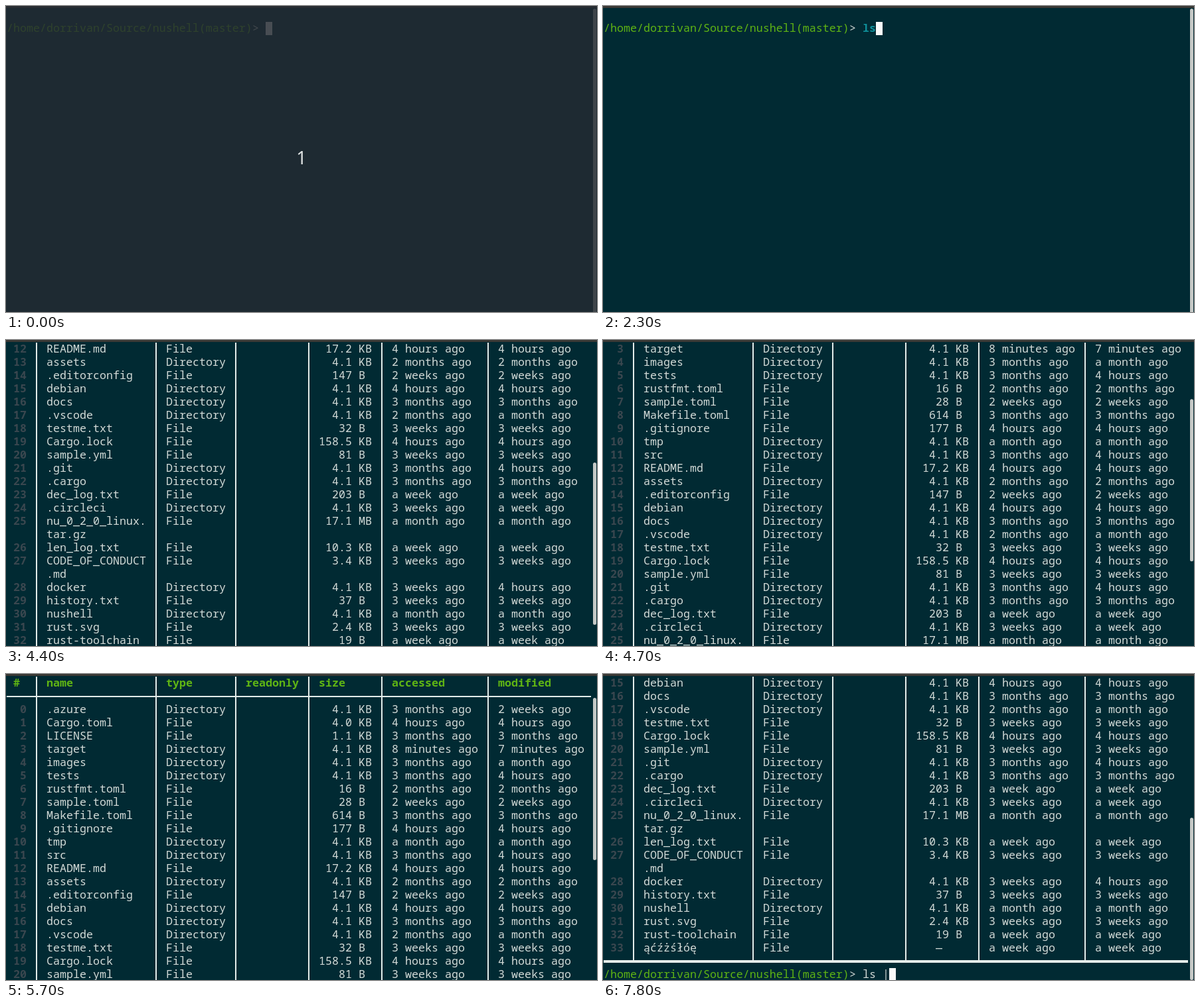
These frames come from a looping animation (890 by 462 pixels, 8 s). An HTML page with a canvas:

```html
<!DOCTYPE html>
<html lang="en">
<head>
<meta charset="utf-8">
<title>Shell session</title>
<style>
html, body { margin: 0; width: 100%; height: 100%; overflow: hidden; background: #012a33; }
canvas { display: block; }
</style>
</head>
<body>
<canvas id="stage" width="890" height="462"></canvas>
<script>
const ctx = document.getElementById('stage').getContext('2d');
const LOOP = 8000, CELL = 10, LINE = 20, TOP = 4, VIEW = 23, TOTAL = 43, PROMPT_LINE = 39;
const BG = '#012a33', TEXT = '#d3dad7', RULE = '#e4ecea', GREEN = '#5fb414', DIM = '#3a474f', TEAL = '#0e8f99';
const FONT = '16.667px "Noto Sans Mono", "DejaVu Sans Mono", monospace';
const PATH = '/home/dorrivan/Source/nushell(master)';

// name | type | size | accessed | modified; a "/" in a name marks a wrapped cell
const rows = `.azure|D|4.1 KB|3 months|2 weeks
Cargo.toml|F|4.0 KB|4 hours|4 hours
LICENSE|F|1.1 KB|3 months|3 months
target|D|4.1 KB|8 minutes|7 minutes
images|D|4.1 KB|3 months|a month
tests|D|4.1 KB|3 months|4 hours
rustfmt.toml|F|16 B|2 months|2 months
sample.toml|F|28 B|2 weeks|2 weeks
Makefile.toml|F|614 B|3 months|3 months
.gitignore|F|177 B|4 hours|4 hours
tmp|D|4.1 KB|a month|a month
src|D|4.1 KB|3 months|4 hours
README.md|F|17.2 KB|4 hours|4 hours
assets|D|4.1 KB|2 months|2 months
.editorconfig|F|147 B|2 weeks|2 weeks
debian|D|4.1 KB|4 hours|4 hours
docs|D|4.1 KB|3 months|3 months
.vscode|D|4.1 KB|2 months|a month
testme.txt|F|32 B|3 weeks|3 weeks
Cargo.lock|F|158.5 KB|4 hours|4 hours
sample.yml|F|81 B|3 weeks|3 weeks
.git|D|4.1 KB|3 months|4 hours
.cargo|D|4.1 KB|3 months|3 months
dec_log.txt|F|203 B|a week|a week
.circleci|D|4.1 KB|3 weeks|a week
nu_0_2_0_linux./tar.gz|F|17.1 MB|a month|a month
len_log.txt|F|10.3 KB|a week|a week
CODE_OF_CONDUCT/.md|F|3.4 KB|3 weeks|3 weeks
docker|D|4.1 KB|3 weeks|4 hours
history.txt|F|37 B|3 weeks|3 weeks
nushell|D|4.1 KB|a month|a month
rust.svg|F|2.4 KB|3 weeks|3 weeks
rust-toolchain|F|19 B|a week|a week
ąćźżśłóę|F|—|a week|a week`.split('\n').map(r => r.split('|'));

// Each track is a list of [start time, value]
const scrollTrack = [[0, -3], [2900, 17], [4400, 14], [4500, 8], [4700, 5], [5000, -1], [5100, -3],
  [5700, 0], [5800, 6], [6200, 9], [6300, 15], [6400, 17]];
const typedTrack = [[0, ''], [2200, 'l'], [2300, 'ls'], [2900, ''], [7300, 'ls'], [7600, 'ls '], [7800, 'ls |']];
const cursorTrack = [[0, 1], [400, 0], [900, 1], [1900, 0], [2100, 1], [3400, 0], [4100, 1], [7000, 0], [7300, 1]];
const at = (track, t) => track.findLast(([start]) => start <= t)[1];

let firstLine = 0;
const lineY = line => TOP + (line - firstLine) * LINE;
const visible = line => line >= firstLine && line < firstLine + VIEW;

function put(str, col, line, color = TEXT, bold = false) {
  if (!visible(line)) return;
  ctx.font = (bold ? 'bold ' : '') + FONT;
  ctx.fillStyle = color;
  ctx.fillText(str, 1 + col * CELL, lineY(line) + 15);
}

function box(x, y, w, h, color) {
  ctx.fillStyle = color;
  ctx.fillRect(x, y, w, h);
}

function prompt(line, command, showCursor) {
  put(PATH, 0, line, GREEN);
  put('>', 37, line);
  const done = !command.includes('|');
  put(command, 39, line, done ? TEAL : TEXT, done);
  if (showCursor && visible(line)) {
    box(1 + (39 + command.length) * CELL, lineY(line), CELL, LINE, '#fafafa');
  }
}

function rules() {
  const from = Math.max(TOP, lineY(-1) + 10);
  const to = Math.min(462, lineY(38) + 10);
  for (const x of [45, 225, 345, 455, 565, 725]) box(x, from, 2, to - from, RULE);
  for (const [line, weight] of [[-1, 4], [1, 2], [38, 4]]) {
    if (visible(line)) box(1, lineY(line) + 10 - weight / 2, 880, weight, RULE);
  }
}

function table() {
  rules();
  const heads = { '#': 1, name: 6, type: 24, readonly: 36, size: 47, accessed: 58, modified: 74 };
  for (const head in heads) put(head, heads[head], 0, GREEN, true);
  let line = 2;
  rows.forEach(([name, type, size, accessed, modified], i) => {
    const [num, unit = ''] = size.split(' ');
    put(String(i), 3 - String(i).length, line, DIM, true);
    put(type === 'D' ? 'Directory' : 'File', 24, line);
    put(num, unit ? 52 - num.length : 50, line);
    put(unit, 53, line);
    put(accessed + ' ago', 58, line);
    put(modified + ' ago', 74, line);
    for (const part of name.split('/')) put(part, 6, line++);
  });
}

function scrollbar(listed) {
  const track = 462 - TOP;
  const y = listed ? TOP + (firstLine + 3) * track / TOTAL : TOP;
  const h = listed ? track * VIEW / TOTAL : track + 8;
  ctx.fillStyle = '#c6c9c7';
  ctx.beginPath();
  ctx.roundRect(884, y, 5, h, 2.5);
  ctx.fill();
}

function countdown() {
  box(0, 0, 890, 462, 'rgba(37, 43, 50, 0.83)');
  ctx.font = '27px "Noto Sans", "Open Sans", sans-serif';
  ctx.fillStyle = '#dfe3e3';
  ctx.textAlign = 'center';
  ctx.fillText('1', 445, 239);
  ctx.textAlign = 'left';
}

function draw(now) {
  const t = now % LOOP;
  const listed = t >= 2900;
  firstLine = at(scrollTrack, t);
  box(0, 0, 890, 462, BG);
  box(0, 0, 890, 3, '#3a3935');
  if (listed) {
    prompt(-2, 'ls', false);
    table();
  }
  prompt(listed ? PROMPT_LINE : -2, at(typedTrack, t), at(cursorTrack, t));
  scrollbar(listed);
  if (t < 100) countdown();
}

function tick() {
  draw(performance.now());
  requestAnimationFrame(tick);
}
tick();
</script>
</body>
</html>
```
